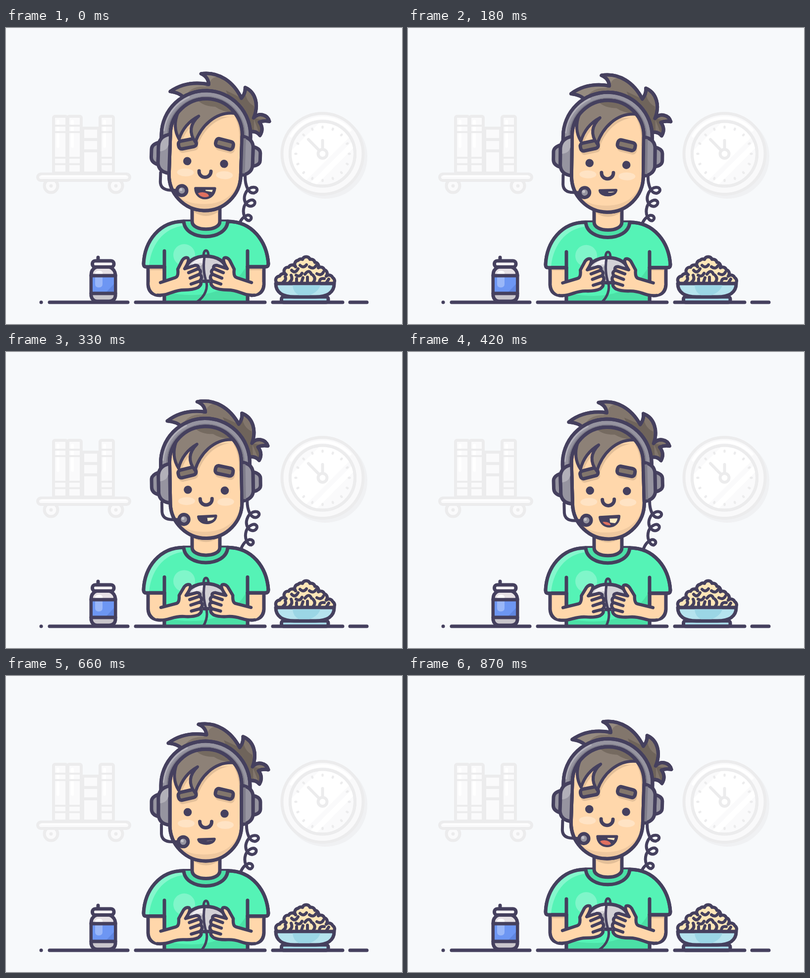
Animation, 800 px wide and 600 px high, one loop 0.9 s. Source, as an HTML page:

```html
<!DOCTYPE html>
<html lang="en">
<head>
<meta charset="utf-8">
<title>Gamer</title>
<style>
  html, body { margin: 0; width: 100%; height: 100%; overflow: hidden; background: #f7f9fb; }
  svg { display: block; width: 800px; height: 600px; }
  .ink { stroke: #45405e; stroke-width: 7; stroke-linecap: round; stroke-linejoin: round; }
  .pale { stroke: #ececed; stroke-width: 6; stroke-linecap: round; stroke-linejoin: round; }
  .line { fill: none; }
  .skin { fill: #ffd7ab; }
  .shade { fill: #e3bf98; }
  .hair { fill: #82766c; }
  .grey { fill: #9694a0; }
  .plain { stroke: none; }
</style>
</head>
<body>
<svg viewBox="0 0 800 600">
  <defs>
    <clipPath id="aboveTable"><path d="M0 0H800V556H0Z"/></clipPath>
    <clipPath id="shirtClip"><use href="#shirt"/></clipPath>
    <clipPath id="faceClip"><use href="#face"/></clipPath>
    <clipPath id="hairClip"><use href="#backHair"/></clipPath>
    <clipPath id="mouthClip"><path id="mouthHole"/></clipPath>
    <clipPath id="dialClip"><circle cx="639.5" cy="255" r="64"/></clipPath>
    <path id="shirt" d="M359 392C310 392 280 432 278 478Q278 484 283 484H320V570H488V484H524Q530 484 530 478C527 432 497 392 448 392Z"/>
    <path id="face" d="M331 221V302A72.5 73 0 0 0 476 302V221A72.5 72.5 0 0 0 331 221Z"/>
    <path id="backHair" d="M356 148Q348 138 328 136Q360 112 405 119Q404 104 389 98C425 92 455 112 472 145Q480 135 479 123C501 132 508 158 498 184C508 172 526 176 530 190Q518 188 510 192Q520 205 512 219Q505 210 492 212L485 222A82 82 0 0 0 356 155Z"/>
    <path id="bangs" d="M345 178Q334 208 349 232Q358 200 387 184Q361 209 382 237C392 205 420 173 460 176"/>
  </defs>

  <!-- shelf -->
  <g class="pale" fill="#fafafb">
    <circle cx="91" cy="320" r="13.5"/><circle cx="222" cy="320" r="13.5"/>
    <g class="plain" fill="#ececed"><circle cx="91" cy="320" r="3.5"/><circle cx="222" cy="320" r="3.5"/></g>
    <rect x="64" y="296" width="186" height="13" rx="6.5"/>
    <path d="M155 203H187V294H155ZM155 226H187M155 249H187"/>
    <g id="books"></g>
    <path d="M72 300H242" stroke="#fff" stroke-width="3"/>
  </g>

  <!-- clock -->
  <g class="pale">
    <circle cx="645" cy="261" r="85" fill="#f0f1f3" class="plain"/>
    <circle cx="639.5" cy="255" r="82" fill="#f9f9fa"/>
    <path class="line" stroke="#fff" d="M576 219A73.5 73.5 0 0 1 695 207"/>
    <circle cx="639.5" cy="255" r="65.5" fill="#fafafb"/>
    <g clip-path="url(#dialClip)" fill="#fff" class="plain">
      <path d="M560 265L670 155L715 200L605 310ZM612 317L722 207L730 215L620 325Z"/>
    </g>
    <circle cx="639.5" cy="255" r="65.5" fill="none"/>
    <g id="ticks" stroke-width="4.5"></g>
    <path class="line" d="M639.5 255L611 226M639.5 255V228"/>
    <circle cx="639.5" cy="255" r="9" fill="#fff"/>
  </g>

  <!-- can -->
  <g class="ink">
    <path d="M186 465V472"/>
    <path fill="#c9c6cc" d="M181 485Q172 490 172 500V543Q174 553 183 554H209Q220 553 221 543V500Q220 490 211 485Z"/>
    <path class="plain" fill="#e6e1e5" d="M184 488Q176 492 176 499H217Q217 492 208 488Z"/>
    <path class="plain" fill="#6d96f3" d="M175 505H218V535H175Z"/>
    <path class="plain" fill="#5f85e0" d="M218 519V535H203Z"/>
    <path class="plain" fill="#9ab7f8" d="M180 505H195V519Q195 526 187.500 526T180 519Z"/>
    <path class="plain" fill="#fff" d="M180 499Q180 492 188 492T195 499Z"/>
    <path d="M172 502H221M172 538H221"/>
    <rect x="174.500" y="472" width="43.500" height="12.500" rx="5.500" fill="#f4f2f4"/>
  </g>

  <!-- popcorn -->
  <g class="ink">
    <path id="popcorn" fill="#fde6b8" stroke-width="6.400"/>
    <path class="line" stroke-width="6" d="M560 515Q567 511 564 504M573 515Q580 510 576 501M577 491Q584 499 590 488M594 481Q601 488 607 480M613 484Q621 490 626 482M586 501Q594 506 598 497M604 499Q612 488 617 499M587 515V508M597 515L600 506M609 515V505M621 515Q627 508 620 501M628 498Q637 503 641 495M633 515Q634 506 643 508M648 515L652 509"/>
    <rect x="556.500" y="545" width="94.500" height="11" rx="4" fill="#a9dcea"/>
    <path fill="#b5e3ee" d="M545 518H663C663 535 650 545 625 545H583C558 545 545 535 545 518Z"/>
    <path class="plain" fill="#9bd6e5" d="M579 521.500H635Q631 535 613 541.500H592Q580 536 579 521.500Z"/>
  </g>

  <path id="cord" class="ink line" d="M486 298C485 318 492 337 504 335C514 332 511 320 498 324C486 329 480 346 488 357C497 367 508 359 505 352C500 345 488 352 484 362C479 378 487 391 494 391C501 388 499 379 490 380C482 383 476 391 473 400" style="stroke-width:6"/>

  <g class="ink" clip-path="url(#aboveTable)">
    <g id="upperArms">
      <g id="upperArm">
        <path class="skin" d="M322 480H287V520Q288 541 312 542L322 520"/>
        <path class="plain shade" d="M290.500 484H318V491H290.500Z"/>
      </g>
      <use href="#upperArm" transform="matrix(-1 0 0 1 808 0)"/>
    </g>
    <g id="body">
      <use href="#shirt" fill="#55f3b6"/>
      <g clip-path="url(#shirtClip)" class="plain">
        <path fill="#85f7cd" d="M278 486C280 425 320 390 375 392L372 400C325 399 294 432 289 482Z"/>
        <path fill="#4be0a6" d="M320 535Q440 560 485 484H488V570H320Z"/>
        <circle cx="360" cy="460" r="22" fill="#80f6ca"/>
      </g>
      <use href="#shirt" fill="none"/>
      <path d="M320 452V484M488 452V484"/>
      <path fill="#4be0a6" d="M359 392C362 433 445 433 448 392"/>
      <path class="skin" d="M376 360V392C376 413 432 413 432 392V360"/>
      <path class="plain shade" d="M379.500 360H428.500V373Q404 389 379.500 373Z"/>
    </g>
    <g id="pad">
      <path id="wire" class="line" stroke-width="5"/>
      <path fill="#4be0a6" stroke-width="5" d="M399 464Q399 451 404 451T409 464"/>
      <ellipse cx="404" cy="488" rx="40" ry="25.500" fill="#d3d1d6"/>
      <path class="plain" fill="#a9a7b0" d="M400 510Q382 510 372 498Q390 488 399 476ZM437 480Q441 500 415 510Q432 492 437 480Z"/>
      <path class="plain" fill="#efedf0" d="M374 481Q382 467 398 466V476Q384 476 374 481Z"/>
      <path class="line" stroke-width="5" d="M401 463Q397 490 404 512"/>
    </g>
    <g id="forearms">
      <g transform="matrix(-1 0 0 1 808 0)"><use href="#forearm"/></g>
      <g id="forearm">
        <path class="plain skin" d="M290.500 515V520Q292 537 308 540L312 516Z"/>
        <path class="plain skin" d="M306 541C330 543 336 531 360 531Q378 531 388 526Q398 518 395 508Q399 503 393 499Q397 493 390 488Q391 479 382 480L361 488Q371 474 370 469Q362 460 355 472L347 489Q349 502 338 507L302 518Z"/>
        <path class="line" stroke-width="6.400" d="M306 541.500C330 543 336 531 360 531Q378 531 388 526Q398 518 391 514M312 516L342 506Q349 504 347 489L356 471Q361 464 367 466Q372 470 361 488L382 481Q391 481 388 488L369 496M388 488Q396 492 391 499L372 507M391 499Q399 505 391 513L374 519"/>
      </g>
    </g>
  </g>

  <path class="ink" d="M71 556H71.100M88 556H246M262 556H523M539 556H680M695 556H729"/>

  <g id="head" class="ink">
    <use href="#backHair" class="hair"/>
    <g clip-path="url(#hairClip)" class="plain">
      <path fill="#968b80" d="M328 139Q360 112 405 119L398 124Q370 122 357 146ZM389 96L428 101Q407 104 407 119Z"/>
      <path fill="#6f645b" d="M440 130Q462 140 472 145L479 123Q478 150 498 160L500 222H480ZM498 184L530 190L512 219Z"/>
    </g>
    <use href="#backHair" fill="none"/>

    <path class="grey" d="M308 240Q294 245 294 254V270Q294 281 308 285ZM499 242Q514 246 514 255V270Q514 279 499 282Z"/>
    <path class="grey" d="M331 236V221A72.500 72.500 0 0 1 476 221V236H493V222A90 90 0 0 0 313 222V236Z"/>
    <path class="line" style="stroke:#7f7d8a;stroke-width:3.500" d="M326 222A77 77 0 0 1 481 222"/>
    <path class="line" style="stroke:#b2b0b9;stroke-width:3.500" d="M318 215A85 85 0 0 1 366 146"/>
    <path class="line" d="M331 236V221A72.500 72.500 0 0 1 476 221V236H493V222A90 90 0 0 0 313 222V236"/>
    <use href="#face" class="skin"/>
    <g clip-path="url(#faceClip)" class="plain">
      <path fill="#efc89f" d="M476 300Q462 369 385 361Q360 358 343 340V390H490V300Z"/>
      <use href="#bangs" class="shade" transform="translate(5 7)"/>
      <path class="shade" d="M467 180Q476 195 476 240H471Q472 205 461 186Z"/>
    </g>
    <g class="hair">
      <rect x="-20" y="-9" width="40" height="20" rx="8" transform="translate(368 246) rotate(-13)" class="plain shade"/>
      <rect x="-18" y="-8" width="36" height="16" rx="6" transform="translate(366 241) rotate(-13)"/>
      <rect x="-20" y="-9" width="40" height="20" rx="8" transform="translate(443 244) rotate(13)" class="plain shade"/>
      <rect x="-18" y="-8" width="36" height="16" rx="6" transform="translate(441 239) rotate(13)"/>
    </g>
    <path class="plain" fill="#8d8177" d="M345 178Q334 208 349 232Q358 200 387 184Q361 209 382 237C392 205 420 173 460 176A72.500 72.500 0 0 0 345 178Z"/>
    <path class="plain" fill="#756a60" d="M384 152Q430 141 455 174Q435 174 420 164Q396 164 384 152Z"/>
    <use href="#bangs" fill="none" stroke-width="6"/>
    <use href="#face" fill="none"/>
    <path class="grey" d="M331 223Q310 226 308 245V282Q310 300 331 302ZM476 222Q497 225 499 242V282Q497 298 476 301Z"/>
    <path class="plain" fill="#b2b0b9" d="M328 227Q312 232 311.500 247V258Q326 256 328 244Z"/>
    <path class="plain" fill="#7f7d8a" d="M479 226H484V297H479Z"/>
    <g fill="#ffe3c4" class="plain"><ellipse cx="364" cy="299" rx="17" ry="8"/><ellipse cx="443" cy="302" rx="17" ry="8"/></g>
    <g fill="#45405e" class="plain"><circle cx="367" cy="276" r="8.300"/><circle cx="441.500" cy="279" r="8.300"/></g>
    <path class="line" d="M391.500 295V296A12 11.500 0 0 0 415.500 296V295"/>
    <path class="line" stroke-width="6" d="M314 301V320Q315 336 335 336H346"/>
    <circle cx="358" cy="336" r="9.800" class="grey"/>
    <circle cx="356" cy="334" r="3" fill="#c3c1c9" class="plain"/>
    <path id="mouth" fill="#45405e" stroke-width="5.500"/>
    <g clip-path="url(#mouthClip)" class="plain">
      <ellipse id="tongue" cx="400" cy="346" rx="13" ry="8" fill="#e0705f"/>
      <path id="tooth" fill="#ffecc4" d="M405 327H422L419 337L406 335Z"/>
    </g>
  </g>
</svg>
<script>
const el = id => document.getElementById(id);
const set = (id, name, value) => el(id).setAttribute(name, value);
const move = (id, x, y, turn = "") => set(id, "transform", `translate(${x} ${y}) ${turn}`);

el("books").innerHTML = [96, 125, 190].map(x =>
  `<rect x="${x}" y="179" width="27" height="115" rx="3"/>
   <path d="M${x + 9} 189V240" style="stroke:#fff"/>
   <path d="M${x} 198H${x + 27}M${x} 211H${x + 27}M${x} 263H${x + 27}M${x} 276H${x + 27}" stroke-width="4"/>`).join("");

el("ticks").innerHTML = Array.from({ length: 16 }, (_, i) =>
  `<path d="M639.5 200V202" transform="rotate(${i * 22.5} 639.5 255)"/>`).join("");

const kernels = [553,503, 566,500, 571,485, 585,484, 590,471, 599,469, 614,469, 624,475, 631,486, 643,490, 647,503, 660,506, 662,518];
let pile = "M549 518";
for (let i = 0; i < kernels.length; i += 2) pile += `A8 8 0 0 1 ${kernels[i]} ${kernels[i + 1]}`;
set("popcorn", "d", pile + "Z");

// A shallow bowl shape hanging from a slightly tilted line.
const bowl = (half, top, depth) =>
  `M${405 - half} ${top + 0.6}L${405 + half} ${top - 0.6}C${403 + half} ${top + depth} ${407 - half} ${top + depth} ${405 - half} ${top + 0.6}Z`;

function draw(now) {
  const time = Math.floor(now % 900 / 30) * 30;
  const wave = Math.cos(time / 900 * 2 * Math.PI);
  const dip = (1 - wave) / 2;
  const lean = dip - 0.55;

  move("head", 0, 9 * lean, `rotate(${-3.5 * lean} 403 252)`);
  move("cord", 5 * lean, lean);
  move("body", 0, 5 * dip);
  move("pad", 0, 8.5 * dip);
  move("upperArms", 0, 1.5 * dip);
  move("forearms", 0, 1.5 * dip);
  set("forearm", "transform", `rotate(${4.8 * dip} 304 530)`);
  set("wire", "d", `M404 512C409 527 ${402 + 2 * dip} 544 ${386 + 9 * dip} 555`);

  // The mouth opens at both ends of the nod.
  const open = wave * wave;
  const half = 16 + 3.5 * open, top = 331 - open;
  set("mouth", "d", bowl(half, top, 11 + 15 * open));
  set("mouthHole", "d", bowl(half - 3, top + 3, 20 * open));
  move("tooth", 0, 7 * dip);
  move("tongue", -6 * dip, 2 * dip);
  requestAnimationFrame(() => draw(performance.now()));
}
draw(0);
</script>
</body>
</html>
```
